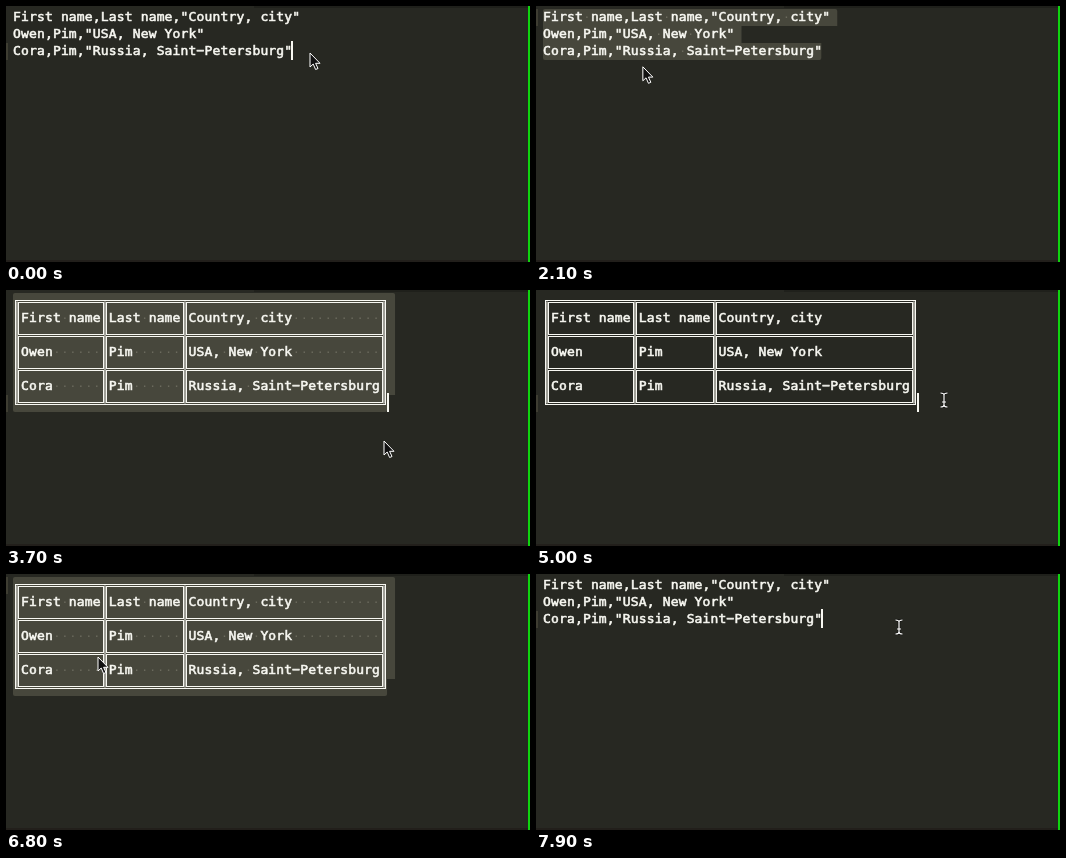
Write an HTML page with a canvas that moves like this. It is 524 px wide and 256 px high and loops after 8 s.

```html
<!DOCTYPE html>
<html lang="en">
<head>
<meta charset="utf-8">
<title>CSV to table</title>
<style>
html, body { margin: 0; width: 100%; height: 100%; overflow: hidden; background: #272822; }
canvas { display: block; }
</style>
</head>
<body>
<canvas id="stage" width="524" height="256"></canvas>
<script>
const ctx = document.getElementById('stage').getContext('2d');
const LOOP = 8000, STEP = 100;
const LEFT = 7, TOP = 3, CHAR = 7.98, ROW = 17;
const INK = '#f8f8f2', PAPER = '#272822', SELECTED = '#47473c';

const people = [
  ['First name', 'Last name', 'Country, city'],
  ['Owen', 'Pim', 'USA, New York'],
  ['Cora', 'Pim', 'Russia, Saint-Petersburg']
];
const widths = people[0].map((_, i) => Math.max(...people.map(cells => cells[i].length)));
const csv = people.map(([first, last, place]) => `${first},${last},"${place}"`);
const bodyRows = people.map(cells =>
  '║' + cells.map((cell, i) => cell.padEnd(widths[i])).join('║') + '║');
const rule = '═'.repeat(bodyRows[0].length);
const table = [rule, ...bodyRows.flatMap(row => [row, rule])];
const bars = [...bodyRows[0]].flatMap((ch, col) => ch === '║' ? [col] : []);

// Each round: drag backwards over the text, point, convert it, visit the menu, click to deselect
const home = [6, 10], menu = [512, 5], start = [304, 47], middle = [408, 110];
const rounds = [
  { text: csv, result: table, drag: 500, held: 1250, convert: 2600, click: 4000, rest: 4700,
    grab: [288, 45], aim: [139, 77], back: [378, 151], end: middle },
  { text: table, result: csv, drag: 5200, held: 6100, convert: 6900, click: 7700, rest: 7900,
    grab: middle, aim: [92, 83], back: [398, 50], end: [363, 53] }
];

const scenes = [[0, csv, 'none'], ...rounds.flatMap(r => [
  [r.drag, r.text, 'drag'],
  [r.held, r.text, 'back'],
  [r.convert, r.result, 'all'],
  [r.click, r.result, 'none']
])];

const stops = [[0, start], ...rounds.flatMap(r => [
  [r.drag, r.grab, 'beam'],
  [r.held, home],
  [r.convert - 100, r.aim],
  [r.convert, r.aim],
  [r.convert + 300, menu],
  [r.convert + 700, r.back],
  [r.click, r.back],
  [r.rest, r.end, 'beam']
])];

const clamp = (v, max) => Math.max(0, Math.min(max, v));
const ease = k => k * k * (3 - 2 * k);
const colX = col => LEFT + col * CHAR;
const rowY = row => TOP + row * ROW;

function mouseAt(t) {
  const i = stops.findLastIndex(stop => stop[0] <= t);
  const [t0, [x0, y0], shape] = stops[i];
  const [t1, [x1, y1]] = stops[i + 1] ?? [LOOP, stops[i][1]];
  const k = ease((t - t0) / (t1 - t0));
  return { x: x0 + (x1 - x0) * k, y: y0 + (y1 - y0) * k, shape };
}

function rect(x, y, w, h, color) {
  ctx.fillStyle = color;
  ctx.fillRect(x, y, w, h);
}

function drawSelection(lines, from) {
  const last = lines.length - 1;
  for (let row = from.row; row <= last; row++) {
    const first = row === from.row ? from.col : 0;
    const x = colX(first);
    const end = colX(lines[row].length) + (row < last ? 7 : -1);
    if (end <= x) continue;
    const top = row === from.row ? 2 : 0, bottom = row === last ? 2 : 0;
    ctx.fillStyle = SELECTED;
    ctx.beginPath();
    ctx.roundRect(x, rowY(row), end - x, ROW, [top, top, bottom, bottom]);
    ctx.fill();
    for (let col = first; col < lines[row].length; col++)
      if (lines[row][col] === ' ') rect(colX(col + .5) - .7, rowY(row) + 7.5, 1.4, 1.4, '#6f6e61');
  }
}

function drawText(lines) {
  ctx.font = '13px "DejaVu Sans Mono", monospace';
  ctx.fillStyle = ctx.strokeStyle = INK;
  ctx.lineWidth = .6;
  lines.forEach((line, row) => [...line].forEach((ch, col) => {
    if (' ║═'.includes(ch)) return;
    const glyph = ch === '-' ? '−' : ch;
    ctx.fillText(glyph, colX(col), rowY(row) + 12);
    ctx.strokeText(glyph, colX(col), rowY(row) + 12);
  }));
}

function drawBorders() {
  const barX = bars.map(col => Math.round(colX(col + .5)));
  const lineY = row => rowY(row) + 8.5;
  const frame = (x0, y0, x1, y1, side) =>
    ctx.strokeRect(x0 + 1.5 * side, y0 + side, x1 - x0 - 3 * side, y1 - y0 - 2 * side);
  const right = barX.at(-1), bottom = table.length - 1;
  for (const x of barX) rect(x - 1, lineY(0), 2, lineY(bottom) - lineY(0), '#a0a098');
  ctx.strokeStyle = INK;
  ctx.lineWidth = 1;
  frame(barX[0], lineY(0), right, lineY(bottom), -1);
  for (let row = 0; row < bottom; row += 2)
    for (let i = 1; i < barX.length; i++)
      frame(barX[i - 1], lineY(row), barX[i], lineY(row + 2), 1);
}

const arrow = new Path2D('M0 0V14L3.2 11L5.6 16.5L8 15.5L5.6 10.3H10Z');
const beam = new Path2D('M-3.5-7Q0-7 0-5V5Q0 7-3.5 7M3.5-7Q0-7 0-5M0 5Q0 7 3.5 7M-2 2H2');

function outline(shape, width, color) {
  ctx.lineWidth = width;
  ctx.strokeStyle = color;
  ctx.stroke(shape);
}

function drawMouse({ x, y, shape }) {
  ctx.save();
  ctx.translate(x, y);
  ctx.lineJoin = 'round';
  if (shape === 'beam') {
    outline(beam, 2.6, '#0008');
    outline(beam, 1.2, '#fff');
  } else {
    ctx.fillStyle = '#111';
    ctx.fill(arrow);
    outline(arrow, 1, '#fff');
  }
  ctx.restore();
}

function draw(t) {
  const [since, lines, mode] = scenes.findLast(scene => scene[0] <= t);
  const mouse = mouseAt(t);
  const last = lines.length - 1;
  const end = { row: last, col: lines[last].length };
  let from = { row: 0, col: 0 };
  if (mode === 'drag') {
    const row = clamp(Math.floor((mouse.y - TOP) / ROW), last);
    from = { row, col: clamp(Math.round((mouse.x - LEFT) / CHAR), lines[row].length) };
  }
  const caret = mode === 'drag' || mode === 'back' ? from : end;
  const lit = mode === 'drag' || (t - since) % 1000 < 500;

  rect(0, 0, 524, 256, PAPER);
  rect(248, 0, 276, 2, '#1f201b');
  rect(0, 254, 524, 2, '#221f1b');
  rect(0, rowY(caret.row), 2, ROW, '#3e3d32');
  if (mode !== 'none') drawSelection(lines, from);
  drawText(lines);
  if (lines === table) drawBorders();
  if (lit) rect(Math.round(colX(caret.col)) - 1, rowY(caret.row) - 2, 2, ROW + 2, INK);
  rect(522, 0, 2, 256, '#0fd40f');
  drawMouse(mouse);
}

function tick() {
  draw(Math.floor(performance.now() % LOOP / STEP) * STEP);
  requestAnimationFrame(tick);
}
tick();
</script>
</body>
</html>
```
